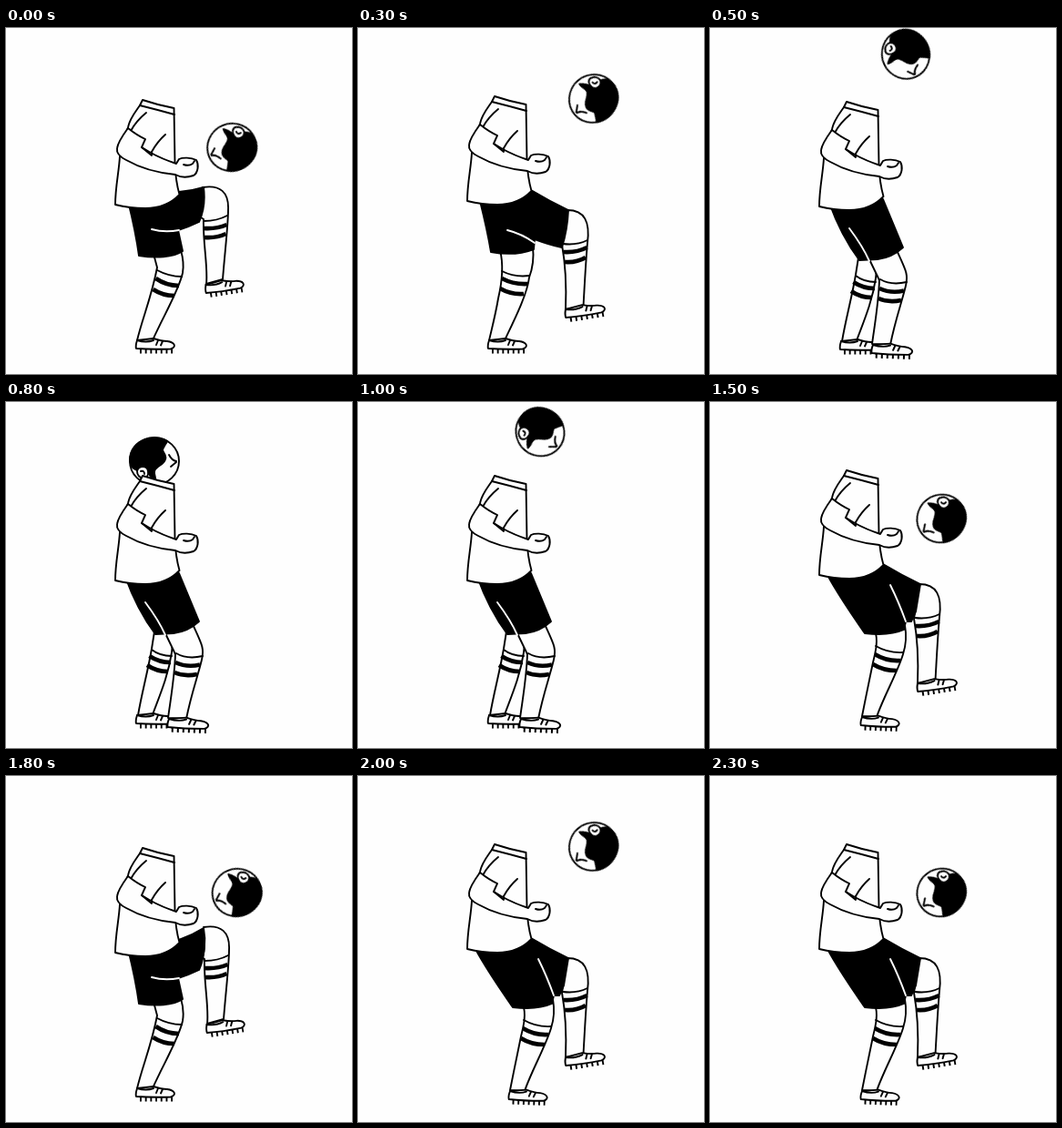
Write an HTML page without scripts that moves like this. It is 380 by 380 pixels and loops after 2.4 s.

```html
<!DOCTYPE html>
<html lang="en">
<head>
<meta charset="utf-8">
<title>Juggling</title>
<style>
html, body { margin: 0; width: 100%; height: 100%; overflow: hidden; background: #fefefe; }
svg { display: block; width: 100%; height: 100%; }
.ink { fill: #fefefe; stroke: #000; stroke-width: 1.9; stroke-linecap: round; stroke-linejoin: round; }
.line { fill: none; }
.black { fill: #000; }
.band { fill: none; stroke-width: 4.6; stroke-linecap: butt; }
.slit { fill: none; stroke: #fefefe; }
.studs { fill: none; stroke-width: 5; stroke-dasharray: 1.9 3.8; stroke-linecap: butt; }

.legs, .torso, .head { animation: 2.4s step-end infinite; }
.legs { animation-name: pose; }
.torso { animation-name: dip; }
.head { animation-name: flight; }

/* Legs switch hard between poses drawn 400 apart */
@keyframes pose {
  0% { transform: none; }
  8.33% { transform: translateX(-800px); }
  20.83% { transform: translateX(-1200px); }
  45.83% { transform: translateX(-1600px); }
  70.83% { transform: translateX(-400px); }
  83.33% { transform: translateX(-1600px); }
}
@keyframes dip {
  0%, 70.83% { transform: translateY(4px); }
  8.33%, 45.83%, 83.33% { transform: none; }
  20.83% { transform: translateY(6px); }
}
/* Kick, turn and landing points; each step lasts 100 ms */
@keyframes flight {
  0% { transform: translate(248px, 131px) rotate(158deg); animation-timing-function: steps(3); }
  12.5% { transform: translate(258.5px, 77.5px) rotate(139deg); animation-timing-function: steps(2); }
  20.83% { transform: translate(215px, 29px) rotate(65deg); animation-timing-function: steps(3); }
  33.33% { transform: translate(163px, 65px) rotate(0deg); }
  41.66% { transform: translate(200px, 33px) rotate(40deg); animation-timing-function: steps(2); }
  50% { transform: translate(258.5px, 77.5px) rotate(139deg); animation-timing-function: steps(3); }
  62.5% { transform: translate(254px, 128px) rotate(142deg); }
  66.66% { transform: translate(258.5px, 77.5px) rotate(145deg); animation-timing-function: steps(2); }
  75% { transform: translate(253.5px, 128px) rotate(158deg); animation-timing-function: steps(2); }
  83.33% { transform: translate(258.5px, 77.5px) rotate(139deg); animation-timing-function: steps(3); }
  95.83%, 100% { transform: translate(254px, 128px) rotate(142deg); }
}
</style>
</head>
<body>
<svg viewBox="0 0 380 380">
<defs>
  <g id="foot">
    <path class="studs" d="M3 12H39"/>
    <path d="M0 0C-1 3-2 6-1 9C12 10 24 10 37 9.500C44 7 41 2 33 1C28 1 24 0 18-2Z"/>
    <path class="line" d="M0 0Q10 3 18 0M23 0L21 5M28 1L26 5.500"/>
  </g>
  <g id="high">
    <path d="M216 175C235 172 245 180 244 200C244 215 241 240 238 276L220 281C222 262 216 235 217 210L214 208Z"/>
    <path class="line" d="M217 212Q232 212 243 206"/>
    <path class="band" d="M217 220Q231 221 242.500 216M218 230Q231 231 241.500 226"/>
    <use href="#foot" transform="translate(219.500 282) rotate(-9)"/>
  </g>
  <g id="low">
    <path d="M230 200C249 200 255 213 252 236C250 258 249 280 247.500 306L228 309C229 285 228 260 224 238Z"/>
    <path class="line" d="M225 237Q240 239 252 233"/>
    <path class="band" d="M225.500 246Q240 247 251.500 241M227 257Q240 258 250 252"/>
    <use href="#foot" transform="translate(228 309) rotate(-9) scale(1.040 1)"/>
  </g>
  <g id="farStand">
    <path d="M162 248L166 263C160 295 150 318 144 343L161 343C172 318 190 288 194 269Q196 258 192 244Z"/>
    <path class="line" d="M166 266Q179 273 193 273"/>
    <path class="band" d="M164.500 275Q176 283 190 283M161.500 287Q172 294 185 294"/>
    <use href="#foot" transform="translate(144 343)"/>
  </g>
  <g id="highShorts">
    <path class="black" d="M134 190L190 180Q204 179 217 175C219 190 217 202 212 213Q202 218 189 222L194 245C184 252 164 253 146 250C143 228 139 210 134 190Z"/>
    <path class="slit" d="M160 221Q174 225 190 222"/>
  </g>
</defs>

<g class="ink">
  <g class="legs">
    <!-- Near knee up -->
    <g>
      <use href="#farStand"/>
      <use href="#high"/>
      <use href="#highShorts"/>
    </g>
    <!-- Near knee higher -->
    <g transform="translate(400)">
      <use href="#farStand"/>
      <use href="#high" transform="translate(1 -9)"/>
      <use href="#highShorts"/>
      <path class="black" d="M190 180Q204 175 217 167C220 182 218 198 212 209Z"/>
    </g>
    <!-- Near leg half lowered -->
    <g transform="translate(800)">
      <path d="M156 244C160 260 158 280 154 297C151 315 147 330 144 343L161 343C172 320 186 292 188 274Q194 258 192 240Z"/>
      <path class="line" d="M158 267Q172 274 188 272"/>
      <path class="band" d="M158 275Q171 282 187 281M156 286Q168 293 182 292"/>
      <use href="#foot" transform="translate(144 343)"/>
      <use href="#low"/>
      <path class="black" d="M134 190L190 178Q210 190 231 200Q230 222 224 241Q210 238 194 232L193 243C180 248 162 249 146 246C143 228 139 210 134 190Z"/>
      <path class="slit" d="M164 222Q180 226 194 236"/>
    </g>
    <!-- Both feet down -->
    <g transform="translate(1200)">
      <path d="M163 252L160 271C156 295 149 320 145 344L160 346C168 324 178 302 182 275L184 252Z"/>
      <path class="line" d="M160 272Q169 279 182 279"/>
      <path class="band" d="M157.500 279Q168 286 181 286M155 289Q165 296 178 296"/>
      <use href="#foot" transform="translate(144 344)"/>
      <path d="M174 252L186 277C185 303 181 325 178 347L198 348C203 322 211 300 215 283C218 270 215 266 205 244Z"/>
      <path class="line" d="M187 276Q199 283 216 279"/>
      <path class="band" d="M186 286Q199 292 213 288.500M185 297Q196 302 210 299"/>
      <use href="#foot" transform="translate(179 348) rotate(2) scale(1.060 1)"/>
      <path class="black" d="M131 192L190 188L212 241Q200 252 184 254L164 255C149 235 140 217 131 192Z"/>
      <path class="slit" d="M153 220Q168 240 175 256"/>
    </g>
    <!-- Far knee up -->
    <g transform="translate(1600)">
      <use href="#low"/>
      <path d="M181 250C185 262 182 274 179 286C174 310 171 325 167 345L183 346C190 325 206 297 212 277Q217 262 214 245Z"/>
      <path class="line" d="M182 268Q196 276 212 275"/>
      <path class="band" d="M181 277Q194 285 209 284M179 288Q190 295 205 295"/>
      <use href="#foot" transform="translate(167 346) rotate(2)"/>
      <path class="black" d="M129 190L190 178Q210 190 231 200Q228 218 226 230L221 241L215 241L213 250C202 255 186 256 170 254C155 232 142 214 129 190Z"/>
      <path class="slit" d="M198 201Q207 219 215 241"/>
    </g>
  </g>

  <g class="head">
    <ellipse rx="27" ry="26"/>
    <path class="black" d="M14-21.500C4-30-27-26-27-1C-26 6-24 8-19 10C-17 5-9 5-7 11C-6 15-3 19 1 22C2 16-2 13 1 9C5 4 10 4 12-2C14-7 9-9 9-13Q11-17 14-21.500Z"/>
    <path d="M-19 11C-17 4-8 5-7 11C-6 16-9 19-12 19C-16 18-19 15-19 11Z"/>
    <path class="line" d="M-15 11Q-11 10-11 14M16-7Q19-1 24 0M18 6L24 1"/>
  </g>

  <g class="torso">
    <path d="M150 75Q168 81 184.500 84L185.500 145C186 160 188 170 190.500 179C182 188 170 194 153 194Q136 194 120 190C120 170 124 155 125 137L134 105C136 95 143 87 147 81Z"/>
    <path class="line" d="M147 81Q167 86 185 91M154 89Q143 98 137 109M175 113Q166 121 160 132"/>
    <path d="M134 106C129 113 123 121 122 128C121 134 126 138 132 141C146 149 166 155 186 157C193 161 200 160 206 158C211 155 212 146 209 141C203 138 194 138 190 140L187 145C178 142 168 138 159 133L149 127L153 118Q144 114 134 106Z"/>
    <path class="line" d="M195 146Q201 148 205 145L207 142M149 127L160 136L160 132"/>
  </g>
</g>
</svg>
</body>
</html>
```
